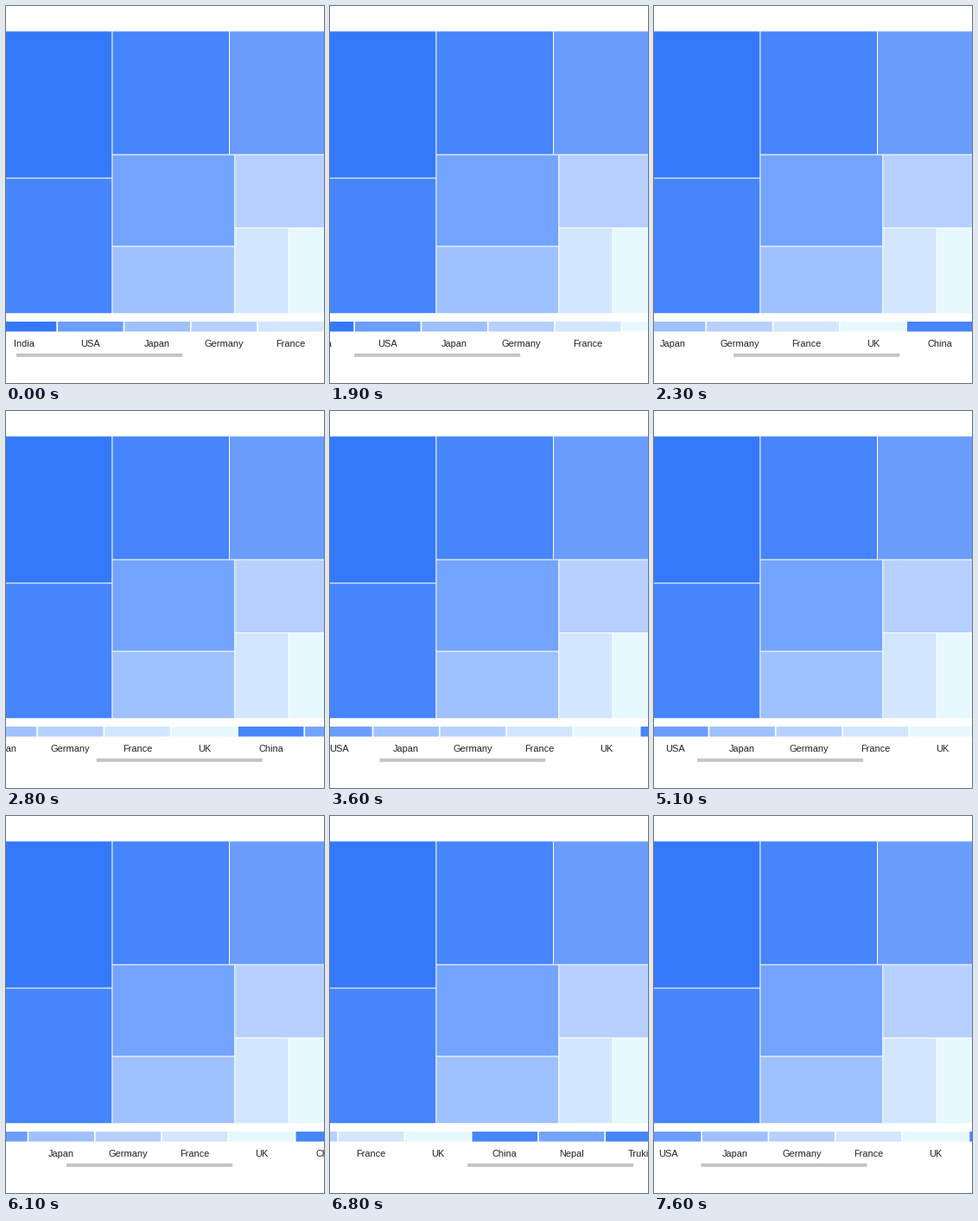
A matplotlib script for the animation above (8.2 s loop, 368 by 436 pixels).

```python
import matplotlib.pyplot as plt
from matplotlib.animation import FuncAnimation
from matplotlib.patches import Rectangle

W, H, DPI = 368, 436, 100
STEP_MS, FRAMES = 100, 82

BLUE = {
    "India": "#3579fb", "USA": "#6b9dff", "Japan": "#9fc1ff",
    "Germany": "#b7d0ff", "France": "#d2e7ff", "UK": "#e7f8ff",
    "China": "#4685fc", "Nepal": "#73a4ff", "Truki": "#4685fc",
}

# Treemap cells: name, left, top, right, bottom
CELLS = [
    ("India", 0, 29.4, 122.3, 198.5),
    ("China", 0, 199.6, 122.3, 355.2),
    ("Truki", 123.4, 29.4, 258, 171.4),
    ("USA", 259, 29.4, W, 171.4),
    ("Nepal", 123.4, 172.5, 264.2, 277.4),
    ("Japan", 123.4, 278.5, 264.2, 355.2),
    ("Germany", 265.3, 172.5, W, 256.1),
    ("France", 265.3, 257.2, 326.6, 355.2),
    ("UK", 327.7, 257.2, W, 355.2),
]

PITCH, BAR_W = 77.3, 75.6
LEGEND_X = -17.3
MAX_SCROLL = 315
THUMB_X, THUMB_W = 12, 192
THUMB_RATIO = THUMB_W / W

# Flings: first frame, moving frames, rest position, first position, decay
FLINGS = [
    (19, 13, 181, 31, 0.654),
    (35, 9, 0, 151, 0.576),
    (48, 8, 81, 26, 0.525),
    (61, 6, 326, 111, 0.55),
    (68, 9, 80.5, 282, 0.5),
]


def scroll_at(frame):
    """Legend offset in pixels: a quick drag that decays to rest."""
    pos = 0
    for start, steps, rest, first, decay in FLINGS:
        if frame >= start:
            n = min(frame - start, steps - 1)
            pos = rest + (first - rest) * decay ** n
    return min(pos, MAX_SCROLL)


fig = plt.figure(figsize=(W / DPI, H / DPI), dpi=DPI, facecolor="white")
ax = fig.add_axes([0, 0, 1, 1])
ax.set_xlim(0, W)
ax.set_ylim(H, 0)
ax.axis("off")


def box(x0, y0, x1, y1, color):
    patch = Rectangle((x0, y0), x1 - x0, y1 - y0, facecolor=color,
                      edgecolor="none", linewidth=0, snap=False)
    return ax.add_patch(patch)


for name, *edges in CELLS:
    box(*edges, BLUE[name])

bars = [box(0, 365, BAR_W, 376.5, color) for color in BLUE.values()]
labels = [
    ax.text(0, 393.6, name, family="Liberation Sans", size=11 * 72 / DPI,
            color="#222222", ha="center", va="baseline", clip_on=True)
    for name in BLUE
]
thumb = box(THUMB_X, 401.8, THUMB_X + THUMB_W, 405.8, "#c4c4c4")


def update(frame):
    scroll = scroll_at(frame)
    for i, (bar, label) in enumerate(zip(bars, labels)):
        x = LEGEND_X + i * PITCH - scroll
        bar.set_x(x)
        label.set_x(x + BAR_W / 2)
        label.set_visible(-40 < x + BAR_W / 2 < W + 40)
    thumb.set_x(THUMB_X + scroll * THUMB_RATIO)
    return [*bars, *labels, thumb]


anim = FuncAnimation(fig, update, frames=FRAMES, interval=STEP_MS,
                     repeat=True, repeat_delay=0, blit=False)
plt.show()
```
